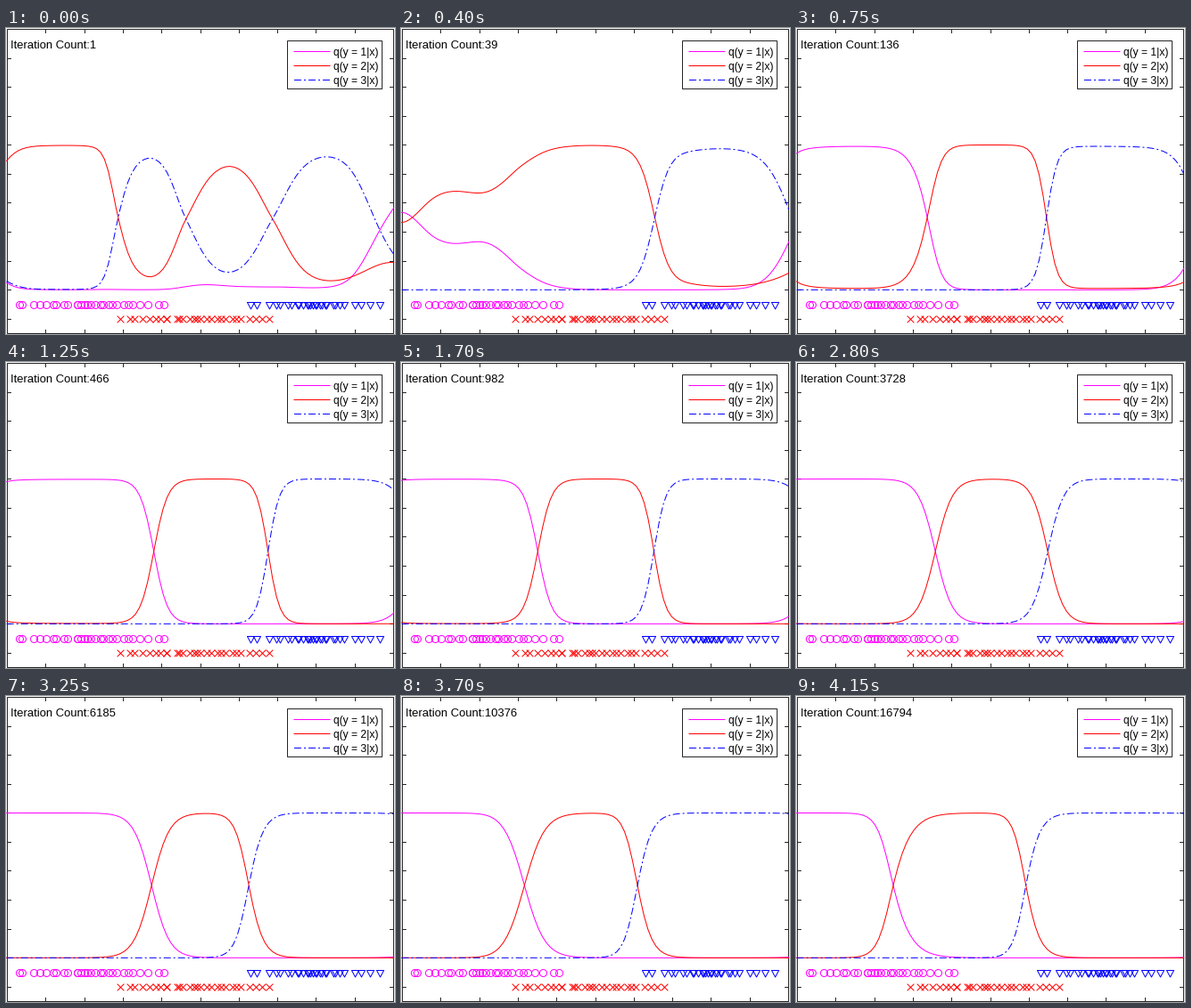
Animation of 436 by 344 pixels, one loop 4.2 s. Source, as a matplotlib script:

```python
import numpy as np
import matplotlib.pyplot as plt
from matplotlib.animation import FuncAnimation

W, H, DPI = 436, 344, 64
PT = 72 / DPI  # points per pixel
FRAMES, INTERVAL = 84, 50
LEFT, RIGHT, TOP, BOTTOM = 1.5, 434.5, 1.5, 343.5
MAGENTA, RED, BLUE, INK = "#ff00ff", "#ff0000", "#0000ff", "#262626"
STYLES = [(MAGENTA, "-"), (RED, "-"), (BLUE, (0, (8, 3, 2, 3)))]

plt.rcParams["font.family"] = "Liberation Sans"


def to_y(v):
    """Map a data value in [-0.3, 1.8] to a pixel row."""
    return BOTTOM - (v + 0.3) / 2.1 * (BOTTOM - TOP)


def smooth(x, xs, ys):
    """Cubic Hermite curve through the given points."""
    xs, ys = np.asarray(xs, float), np.asarray(ys, float)
    m = np.gradient(ys, xs)
    i = np.clip(np.searchsorted(xs, x, side="right") - 1, 0, len(xs) - 2)
    h = xs[i + 1] - xs[i]
    t = (x - xs[i]) / h
    return ((1 + 2 * t) * (1 - t) ** 2 * ys[i] + t * (1 - t) ** 2 * h * m[i]
            + t * t * (3 - 2 * t) * ys[i + 1] - t * t * (1 - t) * h * m[i + 1])


x = np.linspace(1, 435, 100)


def through(*points):
    return smooth(x, *zip(*points))


def edge(center, slope, skew):
    """Falling log-odds, steeper on the left for positive skew."""
    d = x - center
    return -slope * d + skew * (np.hypot(d, 15) - 15)


def capped(odds, limit, border):
    """Hold log-odds softly below a limit that is lowest at the border."""
    limit = limit + 2 * (1 - np.exp(-abs(x - border) / 25))
    return -np.logaddexp(-odds, -limit)


def three_bands(stage, first, second):
    """Log-odds of classes 1 and 3 against 2; the borders settle by stage."""
    l1 = capped(edge(*first), 2.8 + 1.2 * stage, 1)
    l3 = capped(-edge(*second), 2.7 + 4 * stage, 435)
    revival = l3 - 1.7 - 0.8 * stage - 0.085 * (435 - x)
    return np.logaddexp(l1, revival), l3


mixed = (
    through((1, -2.9), (35, -6), (126, -5.5), (210, -3), (270, -3.6),
            (358, -1.34), (400, .46), (435, 1.1)),
    through((1, -2.7), (45, -5.6), (90, -5.2), (126, 0), (159, 2.3),
            (202, 0), (248, -1.95), (299, 0), (358, 2.65), (435, .26)))

# Centre, slope and skew of both band edges at the key poses
BANDS = [((147.5, .118, -.03), (281, .165, 0)),
         ((166, .13, 0), (294, .155, 0)),
         ((142.5, .128, 0), (274, .143, 0)),
         ((156.5, .105, 0), (282.5, .112, 0)),
         ((163.5, .1, 0), (272.5, .125, .013)),
         ((109.3, .103, .03), (258, .13, .025))]
LOGITS = np.array([mixed] + [three_bands(n, *b) for n, b in enumerate(BANDS)])
KEYS = [0, 15, 25, 42, 56, 65, 83]
COUNTS = [1, 136, 466, 1681, 3728, 6185, 16794]


def posteriors(i):
    k = min(np.searchsorted(KEYS, i, side="right") - 1, len(KEYS) - 2)
    t = (i - KEYS[k]) / (KEYS[k + 1] - KEYS[k])
    l1, l3 = (1 - t) * LOGITS[k] + t * LOGITS[k + 1]
    z = np.array([l1, np.zeros_like(x), l3])
    p = np.exp(z - z.max(axis=0))
    return p / p.sum(axis=0)


def count(i):
    log_n = smooth(np.log(i + 1), np.log(np.add(KEYS, 1)), np.log(COUNTS))
    return int(round(float(np.exp(log_n))))


fig = plt.figure(figsize=(W / DPI, H / DPI), dpi=DPI, facecolor="white")
ax = fig.add_axes([0, 0, 1, 1])
ax.set(xlim=(0, W), ylim=(H, 0))
ax.axis("off")


def stroke(xs, ys, color=INK, **kw):
    return ax.plot(xs, ys, color=color, lw=PT, snap=False, **kw)[0]


def box(x0, y0, x1, y1, **kw):
    ax.fill([x0, x1, x1, x0], [y0, y0, y1, y1], fc="white", ec=INK, lw=PT,
            snap=False, joinstyle="miter", **kw)


def pixel(v):
    """Centre of the pixel that holds v."""
    return np.floor(v) + 0.5


# Frame and inward ticks
box(LEFT, TOP, RIGHT, BOTTOM, zorder=0)
for tx in pixel(np.linspace(LEFT, RIGHT, 11)[1:-1]):
    stroke([tx, tx], [TOP, TOP + 4])
    stroke([tx, tx], [BOTTOM, BOTTOM - 4])
for ty in pixel(to_y(np.arange(-0.2, 1.7, 0.2))):
    stroke([LEFT, LEFT + 4], [ty, ty])
    stroke([RIGHT, RIGHT - 4], [ty, ty])

# Samples of the three classes, dense in the middle and sparse outside
turn = np.linspace(0, 2 * np.pi, 33)
circle = 4 * np.cos(turn), 4 * np.sin(turn)
cross = [-3.5, 3.5, np.nan, -3.5, 3.5], [-3.5, 3.5, np.nan, 3.5, -3.5]
triangle = [-4, 4, 0, -4, 4], [-3, -3, 4.5, -3, -3]

rng = np.random.default_rng(3)
u = np.linspace(-1, 1, 28)
for (dx, dy), v, color, mid, core, tail in [
        (circle, -.1, MAGENTA, 95, 55, 28),
        (cross, -.2, RED, 213, 65, 19),
        (triangle, -.1, BLUE, 346, 30, 42)]:
    spots = mid + core * u + tail * u ** 3 + rng.normal(0, 1.5, u.size)
    for sx in pixel(spots):
        stroke(sx + np.array(dx), pixel(to_y(v) + 0.3) + np.array(dy), color)

curves = [stroke(x - 0.3, x, color, ls=ls) for color, ls in STYLES]

# Legend
box(315.5, 14.5, 421.5, 68.5, zorder=4)
for n, (color, ls) in enumerate(STYLES):
    row = 26.5 + 16 * n
    stroke([323, 363], [row, row], color, ls=ls, zorder=5)
    ax.text(367, row + 4.5, f"q(y = {n + 1}|x)", size=12 * PT, zorder=5)

label = ax.text(5, 23, "", size=13 * PT)


def update(i):
    for line, p in zip(curves, posteriors(i)):
        line.set_ydata(to_y(p) - 0.3)
    label.set_text(f"Iteration Count:{count(i)}")
    return [*curves, label]


anim = FuncAnimation(fig, update, frames=FRAMES, interval=INTERVAL,
                     repeat=True, repeat_delay=0, blit=False)
plt.show()
```
